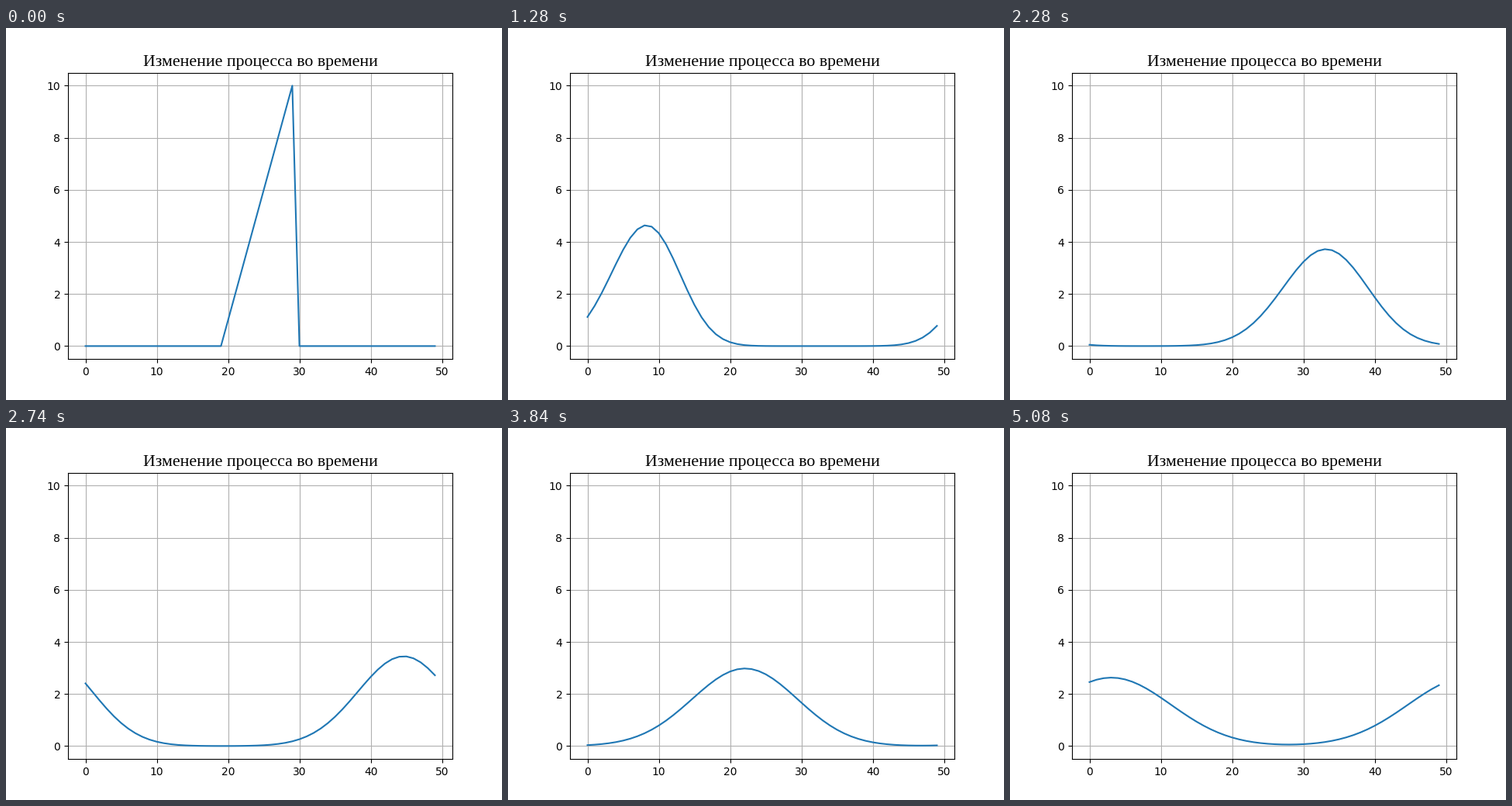
These frames come from a looping animation (640x480 px, 5.1 s). A matplotlib script:

```python
import numpy as np
import matplotlib.pyplot as plt
from matplotlib.animation import FuncAnimation

CELLS = 50
FRAMES = 255
COURANT = 0.5


def start_profile():
    u = np.zeros(CELLS)
    u[20:30] = np.arange(1, 11)
    return u


def upwind(u):
    """One step of the upwind scheme on a periodic grid."""
    return u - COURANT * (u - np.roll(u, 1))


states = [start_profile()]
while len(states) < FRAMES:
    states.append(upwind(states[-1]))

fig, ax = plt.subplots(figsize=(6.4, 4.8), dpi=100)
line, = ax.plot(np.arange(CELLS), states[0])
ax.set_title("Изменение процесса во времени",
             fontname="Liberation Serif", fontsize=15.65)
ax.grid(True)


def update(i):
    line.set_ydata(states[i])
    return line,


anim = FuncAnimation(fig, update, frames=FRAMES, interval=20,
                     repeat=True, repeat_delay=0, blit=False)
plt.show()
```
